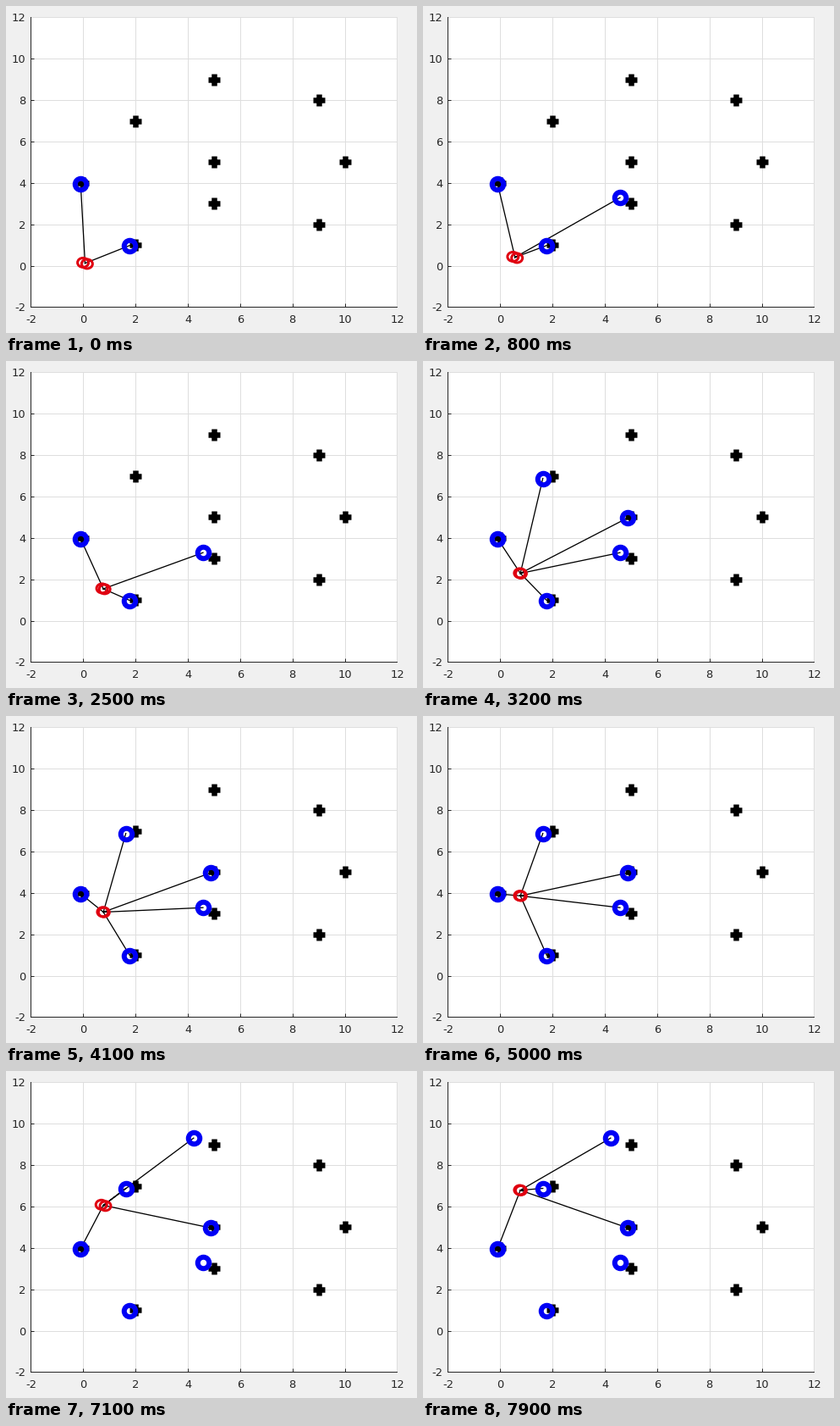
These frames come from a looping animation (486 by 386 pixels, 8 s). A matplotlib script:

```python
import numpy as np
import matplotlib.pyplot as plt
from matplotlib.animation import FuncAnimation
from matplotlib.patches import Ellipse

W, H, DPI = 486, 386, 100
PX = 72 / DPI            # points per pixel
STEPS, STEP_MS = 80, 100
PAUSE = 10               # the robot rests for this one step
SENSOR_RANGE = 5.17
DARK, PALE = "#262626", "#dedede"

LANDMARKS = np.array([(0, 4), (2, 1), (5, 3), (2, 7), (5, 5), (5, 9),
                      (9, 8), (10, 5), (9, 2)], float)
ESTIMATES = np.array([(-0.1, 3.96), (1.78, 0.98), (4.58, 3.29), (1.63, 6.88),
                      (4.87, 4.97), (4.22, 9.31)])

steps = np.arange(STEPS)
clock = steps - (steps >= PAUSE)

# Swing out to the right, then climb at a slightly uneven pace
x = 0.07 + 0.7 * np.sin(np.pi / 2 * np.minimum(clock / 16, 1))
y = np.interp(clock, [0, 16, 31, 49, 60, 70, 78],
              [0.12, 0.69, 2.29, 3.86, 5.24, 6.06, 6.79])
pose = np.column_stack([x, y])

# The two pose markers part early on and again near the top
early = 1 / (1 + np.exp((clock - 24) / 2.5))
late = np.exp(-((clock - 70) / 4) ** 2)
gap = np.outer(0.045 + 0.11 * (early + late), (1, -0.4))

known = LANDMARKS[:len(ESTIMATES)]
in_range = np.linalg.norm(pose[:, None] - known, axis=2) < SENSOR_RANGE
mapped = np.logical_or.accumulate(in_range, axis=0)

plt.rcParams.update({"font.family": "DejaVu Sans", "font.size": 13 * PX,
                     "axes.unicode_minus": False})
fig = plt.figure(figsize=(W / DPI, H / DPI), dpi=DPI, facecolor="#f0f0f0")
ax = fig.add_axes([29.45 / W, 30.55 / H, 433 / W, 342 / H])
ax.set(xlim=(-2, 12), ylim=(-2, 12),
       xticks=range(-2, 13, 2), yticks=range(-2, 13, 2))
ax.set_axisbelow(True)
ax.grid(color=PALE, lw=PX)
ax.tick_params(direction="in", length=4 * PX, width=PX,
               color=DARK, labelcolor=DARK)
ax.tick_params(axis="x", pad=8.6 * PX)
ax.tick_params(axis="y", pad=6 * PX)
for side, spine in ax.spines.items():
    dark = side in ("left", "bottom")
    spine.set(color=DARK if dark else PALE, linewidth=PX,
              zorder=2.6 if dark else 0.6)

ax.plot(*LANDMARKS.T, "+", color="black", ms=13.5 * PX, mew=6.5 * PX,
        zorder=3, snap=False)
rays, = ax.plot([], [], color="black", lw=1.3 * PX, zorder=4, snap=False)
rings, = ax.plot([], [], "o", mfc="none", mec="#0000f5", ms=13.5 * PX,
                 mew=6 * PX, zorder=5, snap=False)


def pose_marker():
    return ax.add_patch(Ellipse((0, 0), 13 / 31, 11 / 24.5, fill=False,
                                ec="#e00010", lw=3 * PX, zorder=6))


markers = [pose_marker(), pose_marker()]


def draw(i):
    rings.set_data(*ESTIMATES[mapped[i]].T)
    # Going back to the robot between rays keeps them in one line
    path = [pose[i]]
    for point in ESTIMATES[in_range[i]]:
        path += [point, (np.nan, np.nan), pose[i]]
    rays.set_data(*np.array(path).T)
    for marker, side in zip(markers, (-0.5, 0.5)):
        marker.center = tuple(pose[i] + side * gap[i])
    return rays, rings, *markers


anim = FuncAnimation(fig, draw, frames=STEPS, interval=STEP_MS,
                     repeat=True, repeat_delay=0)
plt.show()
```
